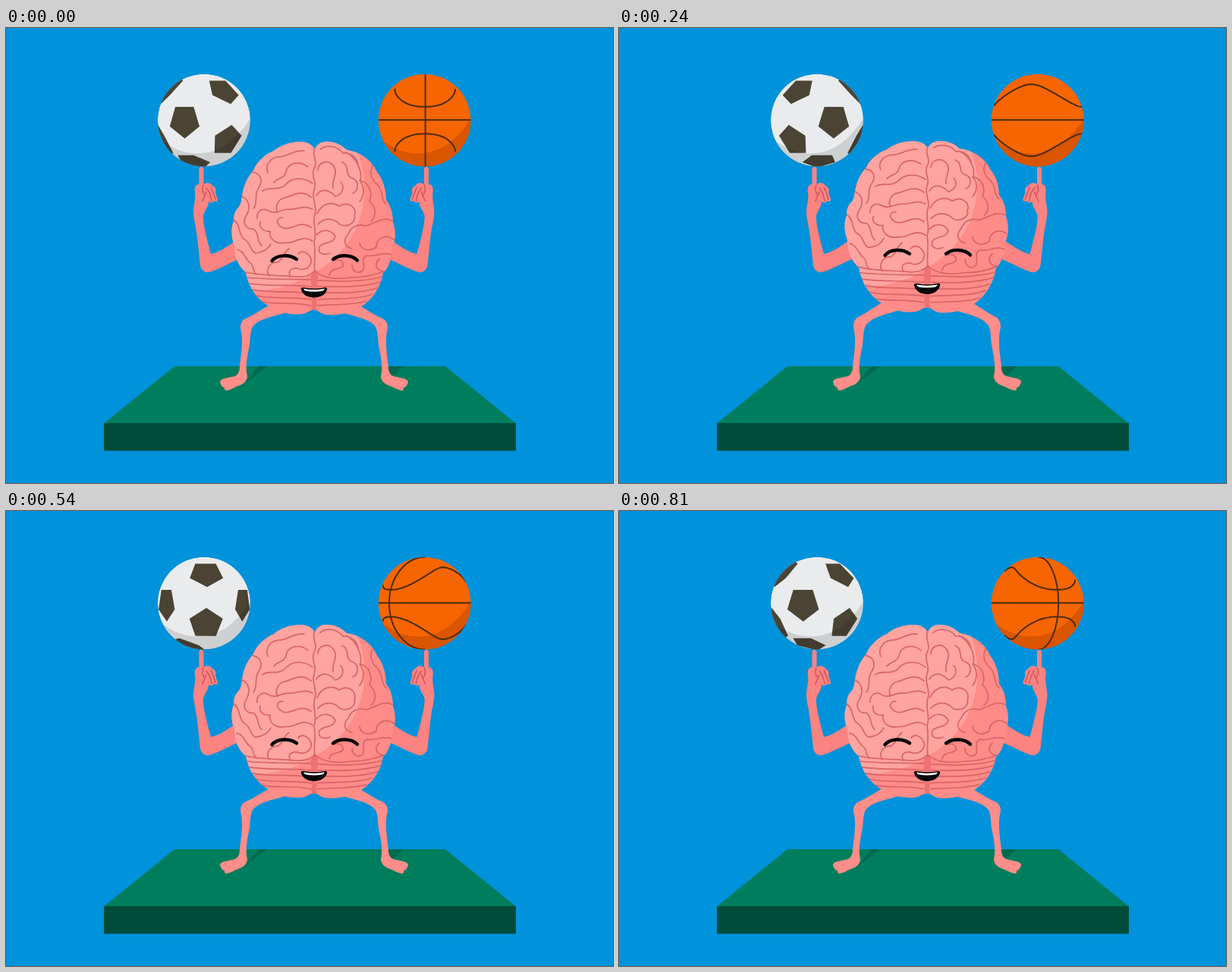
Recreate the animation shown at these times as an HTML page. Size 800 by 600 pixels, loop 840 ms.

```html
<!DOCTYPE html>
<html lang="en">
<head>
<meta charset="utf-8">
<title>Brain juggler</title>
<style>
  html, body { margin: 0; width: 100%; height: 100%; overflow: hidden; background: #0092da; }
  svg { display: block; width: 100vw; height: 100vh; }
  .fold { fill: none; stroke: #d86468; stroke-width: 1.7; stroke-linecap: round; }
  .crease { fill: none; stroke: #c9575e; stroke-width: 1.5; stroke-linecap: round; }
  .eye { fill: none; stroke: #080508; stroke-width: 4.4; stroke-linecap: round; }
  .seam { fill: none; stroke: #4b2c12; stroke-width: 2; }
</style>
</head>
<body>
<svg viewBox="0 0 800 600" xmlns="http://www.w3.org/2000/svg">
  <defs>
    <clipPath id="disc"><circle r="61"/></clipPath>
    <clipPath id="body"><path class="nod" d="M407,160C404,154 397,150 388,150C374,150 361,155 353,162C342,166 330,177 326,188C318,197 313,208 311,222C310,230 309,234 306,237C301,242 300,249 300,255C296,264 297,278 301,287C301,301 306,314 316,322C320,342 330,357 345,366C360,376 378,379 391,377C398,376 401,371 406,372C411,371 414,377 422,378C440,380 458,374 469,367C484,357 494,341 497,323C505,316 509,302 509,290C514,280 514,266 510,256C510,244 507,234 501,227C501,212 496,198 489,190C483,175 467,163 449,161C440,152 430,149 420,150C413,151 409,155 407,160Z"/></clipPath>
    <g id="arm">
      <path fill="#fb8381" d="M254.500,185Q257.500,181 260.500,185L260.500,206C265,203 270,204 272,208C277,210 277,214 276,217L279,226Q279,230 275,228L272,230Q269,231 267,229C267,236 262,240 260,247C259,256 263,270 266,283L270,298C280,296 291,289 302,281L309,304C296,309 281,318 268,322C262,323 257,319 256,313L252,276C250,259 247,252 247,241C248,231 250,225 249,217C248,210 250,206 254.500,206Z"/>
      <path class="crease" d="M260,207C258,212 259,216 261,219M264,216L259,228M264,211C267,214 270,221 271,228M270,210C272,215 275,221 276,226"/>
    </g>
    <path id="leg" class="nod" d="M395,360L350,364C335,372 326,379 314,384C309,388 308,394 310,400C313,416 309,435 308,447C308,456 303,460 297,460C290,462 284,462 282,466C282,469 284,470 284,472Q286,474 288,474Q287,478 291,478C297,477 300,474 306,472C313,470 318,465 318,459C315,447 318,432 321,418C322,408 322,400 325,394C331,386 342,383 352,380C360,378 366,376 374,374L400,368Z"/>
  </defs>

  <rect width="800" height="600" fill="#0092da"/>
  <path fill="#007d5c" d="M222,446H579L672,521.500H129Z"/>
  <path fill="#004c3b" d="M129,521H672V557.500H129Z"/>
  <path fill="#006a4f" d="M315,468L333,446H344L318,466ZM502,446H524L509,460L503,455Z"/>

  <g fill="#ff8d89">
    <use href="#leg"/>
    <use href="#leg" transform="matrix(-1 0 0 1 812 0)"/>
  </g>
  <use href="#arm"/>
  <use href="#arm" transform="matrix(-1 0 0 1 811.5 0)"/>

  <g clip-path="url(#body)">
    <rect x="290" y="140" width="230" height="250" fill="#ff8c88"/>
    <path class="nod" fill="#ffa4a0" d="M290,140L448,140C466,160 474,190 472,220C470,262 445,303 405,323C382,339 355,346 325,346L290,330Z"/>
    <path class="nod" fill="#ee7273" d="M402,326L407,320L411,326L409,374L403,374Z"/>
    <g class="fold">
      <path class="nod" d="M407,158C402,168 412,176 406,186C401,195 411,204 406,214C402,226 411,235 407,246C403,258 411,270 406,282C409,296 405,308 407,322"/>
      <path class="nod" d="M316,322C338,327 362,326 382,328C394,329 402,326 407,320C416,330 435,332 455,329C474,329 488,325 498,321"/>
      <path class="nod" d="M318,329C345,332 375,331 402,332M321,337C348,341 376,338 402,341M325,345C350,350 376,346 402,350M330,353C353,358 379,354 402,358M337,361C356,365 381,361 402,366"/>
      <path class="nod" d="M496,328C466,336 436,334 411,333M493,335C466,343 436,341 411,341M489,343C464,351 436,349 411,349M483,351C461,359 436,356 411,358M475,360C456,366 434,364 411,366"/>
    </g>
    <g class="fold">
      <path class="nod" d="M393,162C378,160 371,171 358,170C347,172 341,182 345,191"/>
      <path class="nod" d="M398,183C386,174 371,178 369,190C367,199 358,197 353,204"/>
      <path class="nod" d="M404,205C391,195 375,198 368,207C359,216 346,208 338,215"/>
      <path class="nod" d="M402,223C388,212 377,222 367,224C358,226 354,236 358,243"/>
      <path class="nod" d="M404,239C392,232 381,241 372,239C362,239 355,247 346,241C338,236 330,242 331,251"/>
      <path class="nod" d="M402,263C387,252 375,269 364,263C354,258 357,249 365,250"/>
      <path class="nod" d="M404,281C390,271 379,286 368,283C356,286 346,278 348,268C340,269 333,264 335,256"/>
      <path class="nod" d="M325,190C336,192 339,201 333,211C326,220 333,230 326,238"/>
      <path class="nod" d="M311,222C320,226 323,236 317,247C310,257 317,266 326,265C334,270 330,281 337,287"/>
      <path class="nod" d="M300,253C309,259 306,270 313,278C323,282 321,294 329,297C338,296 345,293 349,285"/>
      <path class="nod" d="M304,292C313,293 315,304 321,309C328,313 324,320 330,325"/>
      <path class="nod" d="M347,327C341,318 349,308 358,309C366,305 365,296 373,291"/>
      <path class="nod" d="M375,328C369,318 380,315 387,318C396,320 404,313 402,304C397,294 389,293 385,298"/>
    </g>
    <g class="fold">
      <path class="nod" d="M414,160C425,152 438,157 444,165C456,164 463,172 464,181"/>
      <path class="nod" d="M411,188C411,177 424,173 431,181C439,191 429,200 431,211"/>
      <path class="nod" d="M443,177C454,181 446,195 456,198C467,202 464,215 457,218"/>
      <path class="nod" d="M409,221C416,209 428,215 434,222C445,219 446,208 441,203"/>
      <path class="nod" d="M410,245C416,231 430,228 439,235C450,228 461,235 460,246"/>
      <path class="nod" d="M411,259C421,248 434,252 440,259C451,264 462,256 459,247"/>
      <path class="nod" d="M409,273C418,263 430,267 434,275C431,286 417,281 413,289C410,298 420,300 427,297"/>
      <path class="nod" d="M448,164C462,171 470,188 467,202C474,212 471,223 466,229"/>
      <path class="nod" d="M483,182C478,192 483,201 490,207C498,216 493,226 501,232"/>
      <path class="nod" d="M466,201C478,203 484,217 479,228C489,238 488,249 481,255"/>
      <path class="nod" d="M509,254C497,248 486,258 474,261C462,257 454,264 451,272C443,281 447,289 456,291"/>
      <path class="nod" d="M511,279C499,270 488,279 488,289C478,296 467,292 466,283"/>
      <path class="nod" d="M508,299C496,294 486,303 476,300C466,304 475,314 470,320C463,326 456,319 456,312"/>
      <path class="nod" d="M497,321C486,319 486,310 492,305M426,326C428,315 439,320 444,314C445,307 438,304 433,307"/>
    </g>
  </g>

  <path class="nod eye" d="M350.500,307C357,299 373,298 383,305"/>
  <path class="nod eye" d="M431,305C440,298 456,299 463,306.500"/>
  <path class="nod" fill="#080508" d="M389,345C388,342 392,342 394,342.500C402,344 411,344 419,342.500C421,342 424,342 423,345C421,352 414,355.500 406,355.500C398,355.500 391,352 389,345Z"/>
  <path class="nod" fill="#fff" d="M392,343.700C401,345.500 411,345.500 420,343.700Q419,346 417,346.800C410,348 402,348 395,346.800Q393,346 392,343.700Z"/>

  <g transform="translate(261 121.7)" clip-path="url(#disc)">
    <circle r="61" fill="#e9ebed"/>
    <path id="spots" fill="#4b4435"/>
    <path d="M-56,26C-26,50 10,49 36,27C46,18 55,8 61,-3V62H-60Z" opacity=".12"/>
  </g>
  <g transform="translate(551.7 121.7)" clip-path="url(#disc)">
    <circle r="61" fill="#f66500"/>
    <path d="M-56,26C-26,50 10,49 36,27C46,18 55,8 61,-3V62H-60Z" fill="#d95500"/>
    <path id="seams" class="seam"/>
  </g>
</svg>
<script>
  const R = 61, STEP = 30, COUNT = 28, POSES = 7;
  const { sin, cos, PI, abs, hypot, floor } = Math;
  const rad = a => a * PI / 180;
  const fix = v => v.toFixed(2);
  const spots = document.getElementById('spots');
  const seams = document.getElementById('seams');
  const soft = [...document.querySelectorAll('.nod')].map(el => ({ el, d: el.getAttribute('d') }));

  // Vertical shift of the head: strongest at eye level, none at crown and knees.
  const weight = y => y < 142 || y > 410 ? 0 : 7 * sin(PI * (y - 142) / 268);
  function nod(t) {
    const c = cos(2 * PI * (t - 255) / 840);
    const lift = c * abs(c) + 0.11;
    for (const { el, d } of soft) {
      el.setAttribute('d', d.replace(/([\d.]+),([\d.]+)/g,
        (m, x, y) => x + ',' + fix(y - lift * weight(+y))));
    }
  }

  // Patches repeat around the ball: longitude, latitude, direction of the tip.
  const PERIOD = 125;
  const belt = [[0, -1, -1], [65, 43, -1], [64, -28, 1]];
  const turn = [-27, -44, -61, 43.5, 23, 2, -19];

  function pentagon(lonDeg, latDeg, tip) {
    if (abs(lonDeg) > 88.5) return '';
    const lon = rad(lonDeg), lat = rad(latDeg);
    let d = '';
    for (let i = 0; i < 5; i++) {
      const a = rad(tip * 90 + i * 72);
      const u = 0.41 * cos(a), v = 0.41 * sin(a);
      const out = cos(lat) - v * sin(lat);
      const x = out * sin(lon) + u * cos(lon);
      const y = sin(lat) + v * cos(lat);
      const z = out * cos(lon) - u * sin(lon);
      const k = z < 0 ? (1 - z) / hypot(x, y) : 1 / hypot(x, y, z);
      d += (i ? 'L' : 'M') + fix(x * k * R) + ',' + fix(-y * k * R);
    }
    return d + 'Z';
  }

  function football(pose) {
    let d = pentagon(turn[pose] - 13, -69, -1);
    for (const shift of [-PERIOD, 0, PERIOD])
      for (const [lon, lat, tip] of belt)
        d += pentagon(lon + shift + turn[pose], lat, tip);
    spots.setAttribute('d', d);
  }

  // Visible part of the curved seam, from its leftmost to its rightmost point.
  function curve(spin) {
    const pts = [];
    for (let lon = -90; lon <= 90; lon += 3) {
      const lat = rad(17 + 34 * abs(sin(rad(lon - spin))) ** 2.4);
      pts.push([R * cos(lat) * sin(rad(lon)), R * sin(lat)]);
    }
    const xs = pts.map(p => p[0]);
    return pts.slice(xs.indexOf(Math.min(...xs)), xs.indexOf(Math.max(...xs)) + 1);
  }

  function basketball(pose) {
    const spin = -pose * 180 / POSES;
    let d = 'M-61,-.5H61';
    for (const lon of [spin, spin + 180]) {
      if (cos(rad(lon)) < 0.25) continue;
      const s = sin(rad(lon));
      d += `M1,-61A${fix(abs(s) * R + 0.01)},${R} 0 0 ${s < 0 ? 0 : 1} 1,61`;
    }
    const arc = curve(spin);
    for (const side of [-1, 1])
      d += 'M' + arc.map(([x, y]) => fix(x + 0.5) + ',' + fix(side * y)).join('L');
    seams.setAttribute('d', d);
  }

  let last = -1;
  function draw(now) {
    const k = floor(now / STEP) % COUNT;
    if (k !== last) {
      const pose = floor(k / 2) % POSES;
      nod(k * STEP);
      football(pose);
      basketball(pose);
      last = k;
    }
    requestAnimationFrame(draw);
  }
  draw(0);
</script>
</body>
</html>
```
